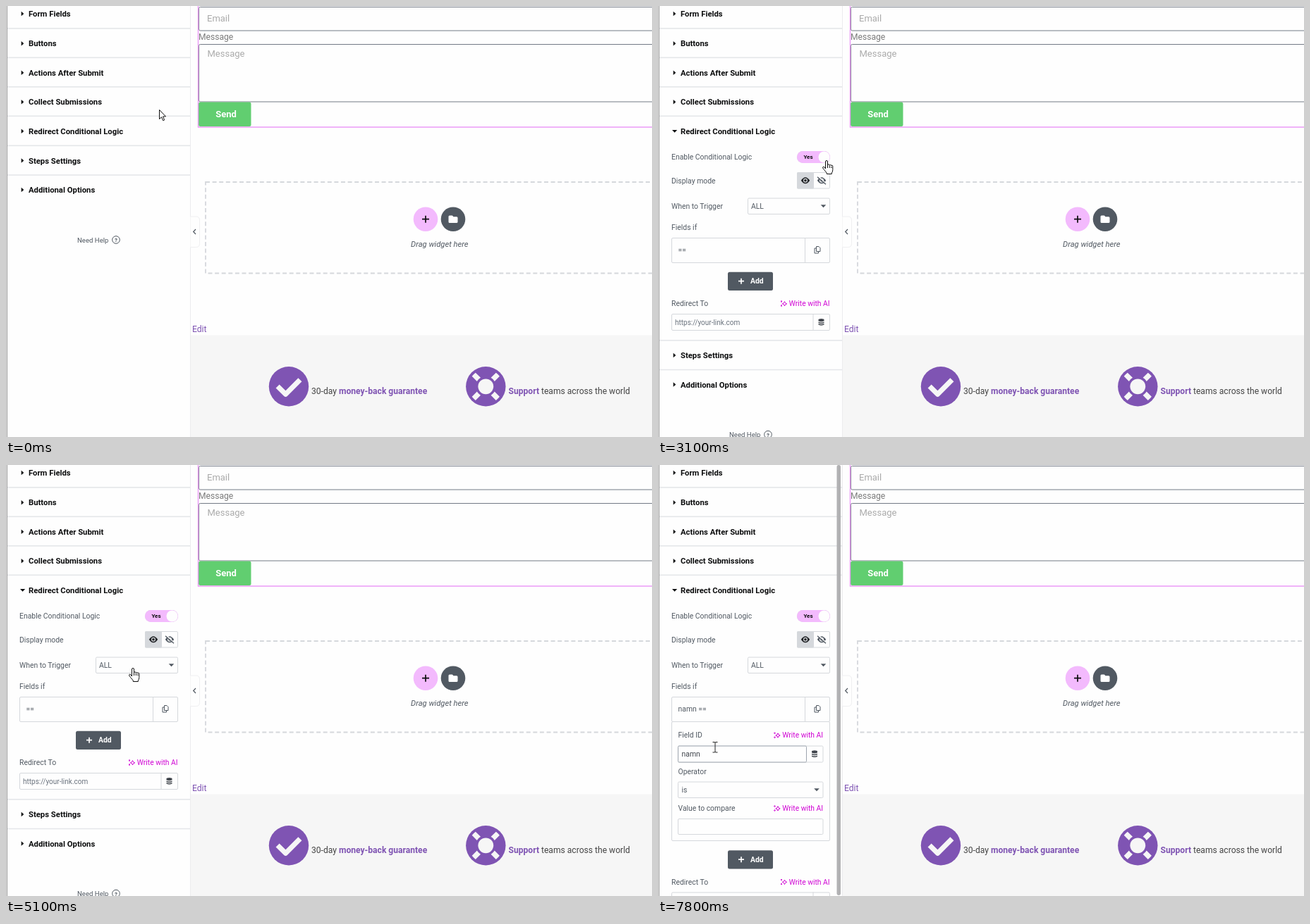
Animation of 916 by 612 pixels, one loop 8000 ms. Source, as an HTML page:

```html
<!DOCTYPE html>
<html lang="en">
<head>
<meta charset="utf-8">
<title>Conditional redirect settings</title>
<style>
html, body { margin: 0; width: 100%; height: 100%; overflow: hidden; background: #fefefe; }
svg { display: block; width: 916px; height: 612px; font-family: Roboto, Arial, sans-serif; }
.h { font-size: 11.3px; font-weight: 700; fill: #0c0d0e; }
.l { font-size: 10.4px; fill: #515962; }
.u { font-size: 10px; fill: #69727d; }
.ai { font-size: 10.3px; fill: #d004d4; text-anchor: end; }
.p { font-size: 13px; fill: #aaa; }
.b { font-size: 12.1px; fill: #444; }
.v { font-size: 12.1px; fill: #7f54b3; }
.v tspan, .b tspan { fill: #7f54b3; font-weight: 700; }
.w { font-weight: 700; fill: #fff; }
.s { font-size: 8px; font-weight: 700; }
.box { fill: #fefefe; stroke: #d5d8dc; }
.form { fill: none; stroke: #737a85; }
</style>
</head>
<body>
<svg id="stage" viewBox="0 0 916 612"></svg>
<script>
const text = (x, y, cls, s, more = '') => `<text x="${x}" y="${y}" dy=".355em" class="${cls}" ${more}>${s}</text>`;
const rect = (x, y, w, h, more) => `<rect x="${x}" y="${y}" width="${w}" height="${h}" ${more}/>`;
const path = (d, more = '') => `<path d="${d}" ${more}/>`;
const circle = (x, y, r, fill) => `<circle cx="${x}" cy="${y}" r="${r}" fill="${fill}"/>`;
const group = (id, body) => `<g id="${id}">${body}</g>`;
const at = (x, y, body) => `<g transform="translate(${x} ${y})">${body}</g>`;
const box = (x, y, w, h, more = '') => rect(x + .5, y + .5, w, h, `class="box" rx="1.5" ${more}`);
const vline = (x, y, h) => rect(x, y, 1, h, 'fill="#d5d8dc"');
const divider = y => rect(2, y - 1, 259, 1.6, 'fill="#e5e7ea"');
const head = (y, s) => path(`M21.7 ${y - 3.2}l3.6 3.2-3.6 3.2z`, 'fill="#0c0d0e"') + text(32, y, 'h', s);
const drop = (x, y) => path(`M${x - 3.8} ${y - 2}h7.6l-3.8 4z`, 'fill="#515962"');
const star = (x, y, r) => path(`M${x} ${y - r}q${r * .15} ${r * .85} ${r} ${r}q${-r * .85} ${r * .15} ${-r} ${r}q${-r * .15} ${-r * .85} ${-r} ${-r}q${r * .85} ${-r * .15} ${r} ${-r}`, 'fill="none" stroke="#d004d4"');
const writeAi = (right, y) => text(right, y, 'ai', 'Write with AI') +
  star(right - 64, y + .3, 3.2) + star(right - 68.5, y - 3, 1) + star(right - 68.5, y + 3, 1);
const stack = (x, y) => at(x, y, [-2.3, .4, 3.1].map(d => path(`M-4 ${d - 1}q4 2 8 0v1.5q-4 2-8 0z`, 'fill="#3f444b"')).join('') +
  '<ellipse cy="-3.6" rx="4" ry="1.5" fill="#3f444b"/>');
const eye = (x, y, slash) => at(x, y, path('M-6.2 0Q0-9 6.2 0Q0 9-6.2 0', `fill="${slash ? '#515962' : '#1f2124'}"`) +
  circle(0, 0, 3, slash ? '#fefefe' : '#d5d8dc') + circle(0, 0, 1.8, slash ? '#515962' : '#1f2124') +
  (slash ? path('M-5-6L6 4.5', 'stroke="#fefefe" stroke-width="1.6"') + path('M-6-5L6 5.5', 'stroke="#515962" stroke-width="1.3"') : ''));
const plus = (x, y, r, color) => path(`M${x - r} ${y}h${2 * r}M${x} ${y - r}v${2 * r}`, `stroke="${color}" stroke-width="1.7"`);

const spoke = path('M7.3-12.45L14.5-19.6A24.4 24.4 0 0 1 19.6-14.5L12.45-7.3A14.4 14.4 0 0 0 7.3-12.45', 'fill="#f6f6f6"');
const ring = [0, 90, 180, 270].map(a => `<g transform="rotate(${a})">${spoke}</g>`).join('');

const page =
  rect(273.5, 1.5, 660, 33.5, 'class="form" rx="2"') + text(285, 17, 'p', 'Email') +
  text(273, 44, 'b', 'Message', 'style="fill:#7a7a7a"') +
  rect(273.5, 54.5, 660, 81.5, 'class="form" rx="2"') + text(285.5, 67.5, 'p', 'Message') +
  rect(273, 136.5, 74.5, 34.5, 'rx="2.5" fill="#61ce70"') + text(312, 153.3, 'w', 'Send', 'font-size="13" text-anchor="middle"') +
  path('M272.5 0V172H916', 'fill="none" stroke="#eb9af8" stroke-width="1.4"') +
  rect(283, 250, 660, 129.5, 'fill="none" stroke="#d5d8dc" stroke-width="1.8" stroke-dasharray="6 3.6"') +
  circle(595, 302.7, 17.3, '#f3bafd') + plus(595, 302.7, 5, '#0c0d0e') +
  circle(634, 302.7, 17.3, '#515962') +
  path('M627.5 299q0-1.5 1.5-1.5h3.8l1.7 1.8h4.5q1.5 0 1.5 1.5v5.700q0 1.500-1.500 1.500h-10q-1.500 0-1.500-1.500z', 'fill="#fff"') +
  text(614.8, 338.5, 'l', 'Drag widget here', 'style="font-size:11.2px;font-style:italic" text-anchor="middle"') +
  text(264, 458.5, 'v', 'Edit') +
  rect(262, 467.5, 654, 145, 'fill="#f6f6f6"') +
  at(401, 540.3, circle(0, 0, 28.2, '#7f54b3') +
    path('M-15.9-.3L-4.5 11 15.9-9.5', 'fill="none" stroke="#f6f6f6" stroke-width="7.2" stroke-linejoin="round"')) +
  text(433, 546.5, 'b', '30-day <tspan>money-back guarantee</tspan>') +
  at(680.3, 540.3, circle(0, 0, 28.2, '#7f54b3') + ring + circle(0, 0, 10.9, '#f6f6f6')) +
  text(712.5, 546.5, 'b', '<tspan>Support</tspan> teams across the world');

const item = // expanded body of the condition
  box(19, 364, 224, 169) +
  text(28.5, 383.7, 'l', 'Field ID') + writeAi(234, 383.7) +
  box(28, 398.5, 205.5, 23) + rect(28.5, 399, 182, 23, 'id="field" rx="1.5" class="box"') + stack(222, 410.3) +
  text(33.5, 410.5, 'l', '', 'id="typed" style="fill:#3f444b"') + rect(34, 404, 1, 13, 'id="caret" fill="#1f2124"') +
  text(28.5, 435.5, 'l', 'Operator') +
  box(28, 449.5, 205.5, 22.5) + text(33.5, 461.3, 'l', 'is') + drop(225, 461.3) +
  text(28.5, 487.5, 'l', 'Value to compare') + writeAi(234, 487.5) + box(28, 502, 205.5, 22);

const condition =
  text(19, 248, 'l', 'Display mode') +
  box(197, 236, 46, 22.5) + rect(197, 236, 24, 23.5, 'fill="#d5d8dc" rx="1.5"') + eye(209, 247.7) + eye(232, 247.7, true) +
  text(19, 284.5, 'l', 'When to Trigger') + box(127, 272.5, 116, 22.5) + text(132, 284.5, 'l', 'ALL') + drop(234.5, 284.3) +
  text(19, 314.5, 'l', 'Fields if') +
  group('item', item) +
  box(19, 329, 224, 35) + vline(208, 329, 35) + text(28.5, 346.7, 'l', '', 'id="rule"') +
  path('M224.500 341.500h3.500l2 2v5h-5.500zM224 344h-2v7h5.500v-2', 'fill="none" stroke="#515962"') +
  group('add', rect(99, 377.7, 64, 26.3, 'fill="#515962" rx="2.5"') + plus(118, 390.7, 4, '#fff') + text(131, 390.8, 'w', 'Add', 'font-size="10.4"'));

const toggle =
  rect(197, 206, 47, 17, 'rx="8.5" fill="#d5d8dc"') +
  text(227, 214.5, 's', 'No', 'fill="#818a96" text-anchor="middle"') +
  group('yes', rect(197, 206, 47, 17, 'rx="8.5" fill="#f3bafd"') + text(213, 214.5, 's', 'Yes', 'fill="#0c0d0e" text-anchor="middle"')) +
  '<circle id="knob" cy="214.5" r="8" fill="#fefefe"/>';

const panel =
  rect(0, 0, 1, 612, 'fill="#e4e4e4"') + rect(1, 0, 1, 612, 'fill="#999"') + rect(261, 0, 1, 612, 'fill="#ececee"') +
  ['Form Fields', 'Buttons', 'Actions After Submit', 'Collect Submissions']
    .map((s, i) => head(i ? 11.7 + 41.5 * i : 11, s) + divider(32 + 41.5 * i)).join('') +
  text(32, 177.7, 'h', 'Redirect Conditional Logic') +
  path('M21.700 174.500l3.600 3.200-3.600 3.200z', 'id="shut" fill="#0c0d0e"') +
  group('open', path('M20 176h7.200l-3.600 3.800z', 'fill="#0c0d0e"') +
    text(19, 214.5, 'l', 'Enable Conditional Logic') + toggle + group('condition', condition)) +
  group('below', group('redirect',
    text(19, 422.5, 'l', 'Redirect To') + writeAi(243.5, 422.5) +
    box(19, 437, 224, 23) + vline(219.5, 437, 24) + text(24, 449.3, 'u', 'https://your-link.com') + stack(231.5, 449)) +
    divider(475) + head(496, 'Steps Settings') + divider(516.7) + head(537.5, 'Additional Options') +
    text(101, 609, 'l', 'Need Help', 'style="font-size:9.6px"') +
    '<circle cx="156" cy="608.500" r="5.300" fill="none" stroke="#515962"/>' +
    text(156, 608.7, 'l', '?', 'text-anchor="middle" style="font-size:8px;font-weight:700"')) +
  rect(253.500, 0, 5.500, 611, 'id="bar" rx="2.700" fill="#b1b1b3"') +
  path('M261.500 299h8q5 0 5 5v33.500q0 5-5 5h-8', 'fill="#fefefe" stroke="#efeff1"') +
  path('M269 317l-3.300 3.500 3.300 3.500', 'fill="none" stroke="#515962" stroke-width="1.200"');

const line = 'fill="#fff" stroke="#111" stroke-linejoin="round"';
const pointer = group('arrow', path('M.5.5V13.500l3-2.800 2.200 5 2-.9-2.200-4.900h4z', line)) +
  group('hand', path('M4.500 12V2q0-1.500 1.500-1.500T7.500 2v5q0-1.200 1.300-1.200T10.300 7.500q0-1 1.200-1t1.400 1.500q0-.8.9-.8t1 1.300v5q0 3-1.500 4.500v1.500h-7V18L2.500 13.500.7 11q-.5-1.500 1-1.800 1.300 0 2.800 2.800', line) +
    path('M7.500 7v4M10.300 8v3M12.900 9v2', 'stroke="#111" fill="none"')) +
  group('beam', path('M.500.500H3Q4 .500 4 1.500 4 .500 5 .500H7.500M4 1.500V14M.500 15H3Q4 15 4 14 4 15 5 15H7.500', 'stroke="#222" fill="none"'));

stage.innerHTML = page + panel + group('cursor', pointer);
const $ = id => document.getElementById(id);
const show = (id, on) => $(id).setAttribute('display', on ? 'inline' : 'none');
const shift = (id, y, x = 0) => $(id).setAttribute('transform', `translate(${x} ${y})`);
const clamp = v => Math.max(0, Math.min(1, v));
const last = (list, t) => list.filter(k => k[0] <= t).pop()[1];

// time, x, y
const route = [[0, 217, 147], [300, 217, 147], [800, 90, 99], [1200, 90, 99], [1400, 102, 156], [1500, 102, 156],
  [1600, 90, 136], [1700, 90, 136], [2500, 106, 171], [2800, 106, 171], [3100, 233, 219], [3300, 256, 214],
  [3600, 219, 212], [4000, 219, 212], [4100, 216, 211], [4600, 216, 211], [5100, 174, 288], [5300, 174, 288],
  [5500, 31, 344], [5600, 31, 344], [6000, 77, 393], [8000, 77, 393]];
const shapes = [[0, 'arrow'], [700, 'hand'], [3200, 'arrow'], [3400, 'hand'], [5900, 'beam']];
const words = [[0, ''], [7000, 'na'], [7200, 'namn'], [7300, 'namne'], [7700, 'namn']];

function draw(t) {
  const opened = t >= 2700, enabled = t < 3700 || t >= 4500, expanded = t >= 5700;
  const grow = expanded ? 169.5 : 0;
  show('shut', !opened);
  show('open', opened);
  show('redirect', opened);
  show('condition', enabled);
  show('item', expanded);
  shift('add', grow);
  shift('below', !opened ? -276.5 : enabled ? grow : -180.5);

  const on = t < 4400 ? clamp((3900 - t) / 300) : clamp((t - 4400) / 300);
  $('yes').setAttribute('opacity', on);
  $('knob').setAttribute('cx', 205.5 + 30 * on);

  const word = last(words, t);
  $('typed').textContent = word;
  $('rule').textContent = word ? word + ' ==' : '==';
  $('field').style.stroke = t >= 6200 ? '#9da5ae' : '#d5d8dc';
  $('caret').setAttribute('x', 34 + (word && $('typed').getComputedTextLength()));
  show('caret', t >= 6200 && t < 6700 || t >= 7000 && t < 7800);
  show('bar', t >= 7000);

  const i = route.findIndex(k => k[0] > t), [t0, x0, y0] = route[i - 1], [t1, x1, y1] = route[i];
  const p = (t - t0) / (t1 - t0), e = p * p * (3 - 2 * p);
  shift('cursor', y0 + (y1 - y0) * e, x0 + (x1 - x0) * e);
  for (const s of ['arrow', 'hand', 'beam']) show(s, s === last(shapes, t));
}

const start = performance.now();
function tick() {
  draw(Math.floor((performance.now() - start) % 8000 / 100) * 100); // ten pictures a second
  requestAnimationFrame(tick);
}
tick();
</script>
</body>
</html>
```
